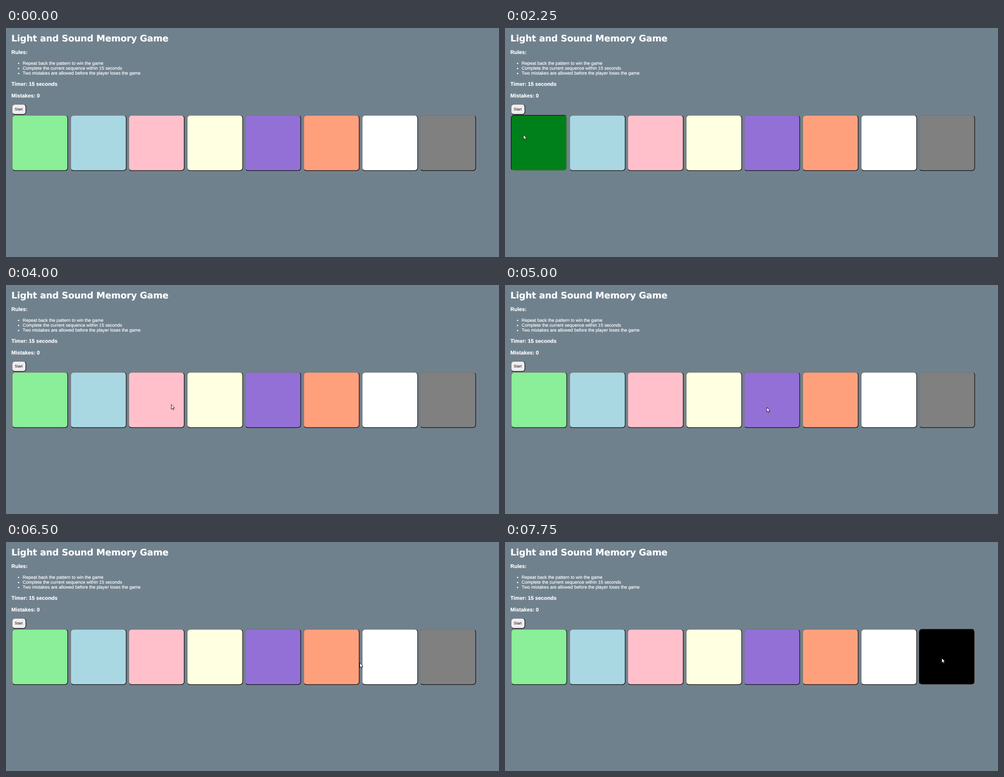
An HTML page that plays this animation: 1096 px wide and 511 px high, repeating every 8 s.

```html
<!DOCTYPE html>
<html lang="en">
<head>
<meta charset="utf-8">
<title>Memory Game</title>
<style>
  html, body { margin: 0; width: 100%; height: 100%; overflow: hidden; background: #70818e; }
  svg { display: block; width: 100%; height: 100%; }
  text { font: 9.97px "Liberation Sans", Arial, sans-serif; fill: #fff; stroke: #fff; stroke-width: .2; text-rendering: geometricPrecision; }
  .title { font: bold 20px "DejaVu Sans", Verdana, sans-serif; letter-spacing: -.17px; }
  .head { font-size: 11.7px; font-weight: bold; }
  .label { font-size: 8.33px; fill: #000; stroke: none; }
  .edge { fill: none; stroke-width: 1.5; }
</style>
</head>
<body>
<svg viewBox="0 0 1096 511">
  <rect width="1096" height="511" fill="#70818e"/>
  <g id="page"></g>
  <path id="cursor" d="M0 0V10.6L2.4 8.4L4 12L5.7 11.3L4.2 7.8H7.3Z"
        fill="#fff" stroke="#000" stroke-width=".9" stroke-linejoin="round"/>
</svg>
<script>
const LOOP = 8000, STEP = 250;
const LIGHT = '#767676', DARK = '#1c1c1c';
const page = document.getElementById('page');
const cursor = document.getElementById('cursor');

// Each tile is clicked once: press is counted in steps, x is where the pointer clicks.
const TILES = [
  { idle: '#8aef98', active: '#00801a', press: 9, x: 41 },
  { idle: '#a9d8e3', active: 'blue', press: 11, x: 175 },
  { idle: 'pink', active: 'red', press: 14, x: 266 },
  { idle: '#ffffe1', active: 'yellow', press: 18, x: 469 },
  { idle: '#9370d6', active: 'purple', press: 21, x: 582 },
  { idle: '#ffa07d', active: 'darkorange', press: 24, x: 719 },
  { idle: 'white', active: 'silver', press: 28, x: 854 },
  { idle: 'gray', active: 'black', press: 31, x: 971 }
];
const RULES = [
  'Repeat back the pattern to win the game',
  'Complete the current sequence within 15 seconds',
  'Two mistakes are allowed before the player loses the game'
];

function add(name, attrs, text = '') {
  const node = document.createElementNS('http://www.w3.org/2000/svg', name);
  for (const key in attrs) node.setAttribute(key, attrs[key]);
  node.textContent = text;
  return page.appendChild(node);
}

function write(text, x, y, style = '') {
  add('text', { class: style, x, y }, text);
}

// Rounded button whose border is split at the corners into two shades.
function makeButton(x, y, w, h, r) {
  const inset = 0.75, cut = r * (1 - Math.SQRT1_2);
  const left = x + inset, top = y + inset;
  const right = x + w - inset, bottom = y + h - inset;
  const arc = (px, py) => `A${r} ${r} 0 0 1 ${px} ${py}`;
  const face = add('rect', { x: left, y: top, width: right - left, height: bottom - top, rx: r });
  const upper = add('path', { class: 'edge', d:
    `M${left + cut} ${bottom - cut}${arc(left, bottom - r)}V${top + r}${arc(left + r, top)}` +
    `H${right - r}${arc(right - cut, top + cut)}` });
  const lower = add('path', { class: 'edge', d:
    `M${right - cut} ${top + cut}${arc(right, top + r)}V${bottom - r}${arc(right - r, bottom)}` +
    `H${left + r}${arc(left + cut, bottom - cut)}` });
  return (color, down) => {
    face.setAttribute('fill', color);
    upper.setAttribute('stroke', down ? DARK : LIGHT);
    lower.setAttribute('stroke', down ? LIGHT : DARK);
  };
}

write('Light and Sound Memory Game', 12, 30.2, 'title');
write('Rules:', 12.1, 58.4, 'head');
RULES.forEach((rule, i) => {
  const y = 82 + 11.2 * i;
  add('circle', { cx: 28, cy: y - 2.9, r: 1.5, fill: '#fff' });
  write(rule, 37, y);
});
write('Timer: 15 seconds', 12.1, 129.2, 'head');
write('Mistakes: 0', 12.1, 154.5, 'head');
makeButton(12.8, 169.5, 32.2, 24, 6)('#efedef', false);
write('Start', 19.6, 184.1, 'label');

TILES.forEach((tile, i) => {
  const next = TILES[i + 1];
  // A tile is let go halfway to the next click.
  tile.release = next ? Math.ceil((tile.press + next.press) / 2) : LOOP / STEP;
  tile.paint = makeButton(Math.round(13.2 + 129.55 * i), 194, 125, 125, 6.5);
});

// The pointer crosses the row of tiles along a shallow arc.
const arcY = x => 273 - (x - 610) ** 2 / 9300;

function pointerAt(step) {
  const enter = 3, reach = 8;
  if (step < enter) return null;
  if (step < reach) {
    const rest = 0.29 ** (step - enter);
    return [32.5 + 113 * rest, 186 + 192.5 * rest];
  }
  const i = Math.max(0, TILES.findLastIndex(tile => tile.press <= step));
  const { x, release } = TILES[i], next = TILES[i + 1];
  if (step < release) return [x, arcY(x)];
  const part = (step - release + 1) / (next.press - release);
  const px = x + (next.x - x) * part;
  return [px, arcY(px)];
}

function draw(time) {
  const step = Math.floor(time / STEP);
  for (const { idle, active, press, release, paint } of TILES) {
    const down = step >= press && step < release;
    paint(down ? active : idle, down);
  }
  const at = pointerAt(step);
  cursor.setAttribute('visibility', at ? 'visible' : 'hidden');
  if (at) cursor.setAttribute('transform', `translate(${at})`);
}

const start = performance.now();
function tick() {
  draw((performance.now() - start) % LOOP);
  requestAnimationFrame(tick);
}
tick();
</script>
</body>
</html>
```
